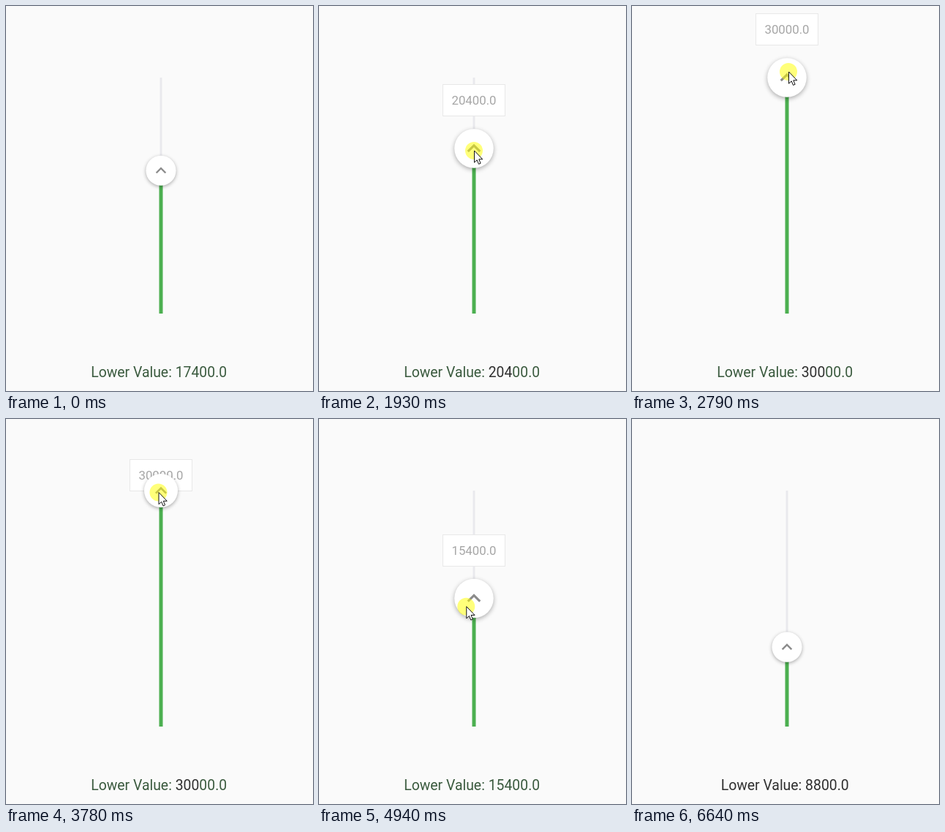
These frames come from a looping animation (420x527 px, 6870 ms). An HTML page with a canvas:

```html
<!DOCTYPE html>
<html>
<head>
<meta charset="utf-8">
<style>
html, body { margin: 0; width: 100%; height: 100%; overflow: hidden; background: #fafafa; }
canvas { display: block; }
</style>
</head>
<body>
<canvas id="stage" width="420" height="527"></canvas>
<script>
const ctx = document.getElementById('stage').getContext('2d');
const LOOP = 6870, STEPS = 89, STEP = LOOP / STEPS;
const CX = 212, TOP = 98, BOTTOM = 421, MAX = 30000;

// [step, value]
const values = [[21, 17400], [25, 20400], [30, 24200], [35, 30000], [51, 30000],
  [57, 24400], [59, 22800], [66, 12300], [70, 8800]];
// [step, x, y] while the pointer is on the slider
const pointer = [[9, 216, 232], [10, 212, 228], [21, 212, 228], [25, 212, 198],
  [30, 213, 159], [36, 214, 90], [39, 211, 54], [41, 211, 54], [47, 209, 100],
  [51, 208, 101], [57, 203, 164], [59, 202, 181], [66, 201, 287], [70, 201, 316], [79, 201, 316]];
// press start in ms, release step
const presses = [[800, 40], [3754, 73]];

const mix = (a, b, t) => a + (b - a) * t;

function keyed(keys, step, col) {
  if (step <= keys[0][0]) return keys[0][col];
  for (let i = 1; i < keys.length; i++) {
    const a = keys[i - 1], b = keys[i];
    if (step <= b[0]) return mix(a[col], b[col], (step - a[0]) / (b[0] - a[0]));
  }
  return keys[keys.length - 1][col];
}

function elasticOut(t) {
  if (t >= 1) return 1;
  return 1 + Math.pow(2, -10 * t) * Math.sin((t - 0.1) * 2 * Math.PI / 0.4);
}

// cubic-bezier(.4, 0, .2, 1)
function fastOutSlowIn(t) {
  if (t >= 1) return 1;
  let lo = 0, hi = 1;
  for (let i = 0; i < 20; i++) {
    const u = (lo + hi) / 2, v = 1 - u;
    if (1.2 * v * v * u + 0.6 * v * u * u + u * u * u < t) lo = u; else hi = u;
  }
  return lo * lo * (3 - 2 * lo);
}

function pointerAt(step) {
  if (step < 1 || step > 85) return null;
  if (step < 9) {
    const left = Math.pow((9 - step) / 9, 1.6);
    return [mix(216, 328, left), mix(232, 572, left)];
  }
  if (step > 79) {
    const p = Math.pow((step - 79) / 7, 1.3);
    return [mix(201, 410, p), mix(316, 560, p)];
  }
  return [keyed(pointer, step, 1), keyed(pointer, step, 2)];
}

function drawTrack(y) {
  ctx.fillStyle = '#e9e9ed';
  ctx.fillRect(CX - 1.5, TOP, 3, Math.max(0, y - TOP));
  ctx.fillStyle = '#4caf50';
  ctx.fillRect(CX - 2.5, y, 5, BOTTOM - y);
}

function drawTooltip(text, y, age) {
  ctx.font = '16.8px Roboto, Arial, sans-serif';
  const w = Math.round(ctx.measureText(text).width + 22.5);
  const x = Math.round(CX - w / 2);
  const top = Math.round(y - 86.7 + 47 * (1 - fastOutSlowIn(age / 200)));
  ctx.fillStyle = '#fff';
  ctx.fillRect(x, top, w, 42);
  ctx.strokeStyle = '#e8e8e8';
  ctx.lineWidth = 1;
  ctx.strokeRect(x - 0.5, top - 0.5, w + 1, 43);
  ctx.fillStyle = '#a6a6a6';
  ctx.textAlign = 'center';
  ctx.fillText(text, CX, top + 27);
}

function drawHandle(y, scale) {
  ctx.save();
  ctx.translate(CX, y);
  ctx.scale(scale, scale);
  ctx.save();
  ctx.shadowColor = 'rgba(0,0,0,0.32)';
  ctx.shadowBlur = 5 * scale;
  ctx.shadowOffsetY = 1.5 * scale;
  ctx.fillStyle = '#fff';
  ctx.beginPath();
  ctx.arc(0, 0, 20.6, 0, 2 * Math.PI);
  ctx.fill();
  ctx.restore();
  ctx.scale(1.2, 1.2);
  ctx.fillStyle = '#8c8c8c';
  ctx.fill(new Path2D('M0-4L-6 2-4.59 3.41 0-1.17 4.59 3.41 6 2z'));
  ctx.restore();
}

function drawLabel(text, step) {
  ctx.font = '19.4px Roboto, Arial, sans-serif';
  ctx.textAlign = 'left';
  const green = '#3a5a3e', dark = '#303030';
  const settled = text.length < 7;
  const parts = [['Lower Value: ', settled ? dark : green],
    [text.slice(0, 3), settled || (step > 21 && step < 58) ? dark : green],
    [text.slice(3), settled ? dark : green]];
  let x = 209.2 - ctx.measureText('Lower Value: ' + text).width / 2;
  for (const [part, color] of parts) {
    ctx.fillStyle = color;
    ctx.fillText(part, x, 507.5);
    x += ctx.measureText(part).width;
  }
}

function drawPointer(x, y) {
  ctx.fillStyle = 'rgba(255,255,0,0.52)';
  ctx.beginPath();
  ctx.arc(x, y, 12, 0, 2 * Math.PI);
  ctx.fill();
  ctx.save();
  ctx.translate(x + 0.5, y);
  const arrow = new Path2D('M0 0V16.2L3.7 12.8 6 18.4 8.6 17.3 6.3 11.8H11.3z');
  ctx.fillStyle = '#fff';
  ctx.fill(arrow);
  ctx.strokeStyle = '#111';
  ctx.lineWidth = 1;
  ctx.stroke(arrow);
  ctx.restore();
}

function draw(ms) {
  const step = Math.min(STEPS - 1, Math.floor((ms + 8) / STEP));
  const time = step * STEP;
  const value = Math.round(keyed(values, step, 1) / 200) * 200;
  const y = TOP + (MAX - value) * 0.0101;
  const text = value.toFixed(1);
  const press = presses.find(p => time >= p[0] && step < p[1]);

  ctx.fillStyle = '#fafafa';
  ctx.fillRect(0, 0, 420, 527);
  drawTrack(y);
  if (press) drawTooltip(text, y, time - press[0]);
  drawHandle(y, press ? 1 + 0.3 * elasticOut((time - press[0]) / 700) : 1);
  drawLabel(text, step);
  const at = pointerAt(step);
  if (at) drawPointer(at[0], at[1]);
}

const start = performance.now();
function tick() {
  draw((performance.now() - start) % LOOP);
  requestAnimationFrame(tick);
}
tick();
</script>
</body>
</html>
```
